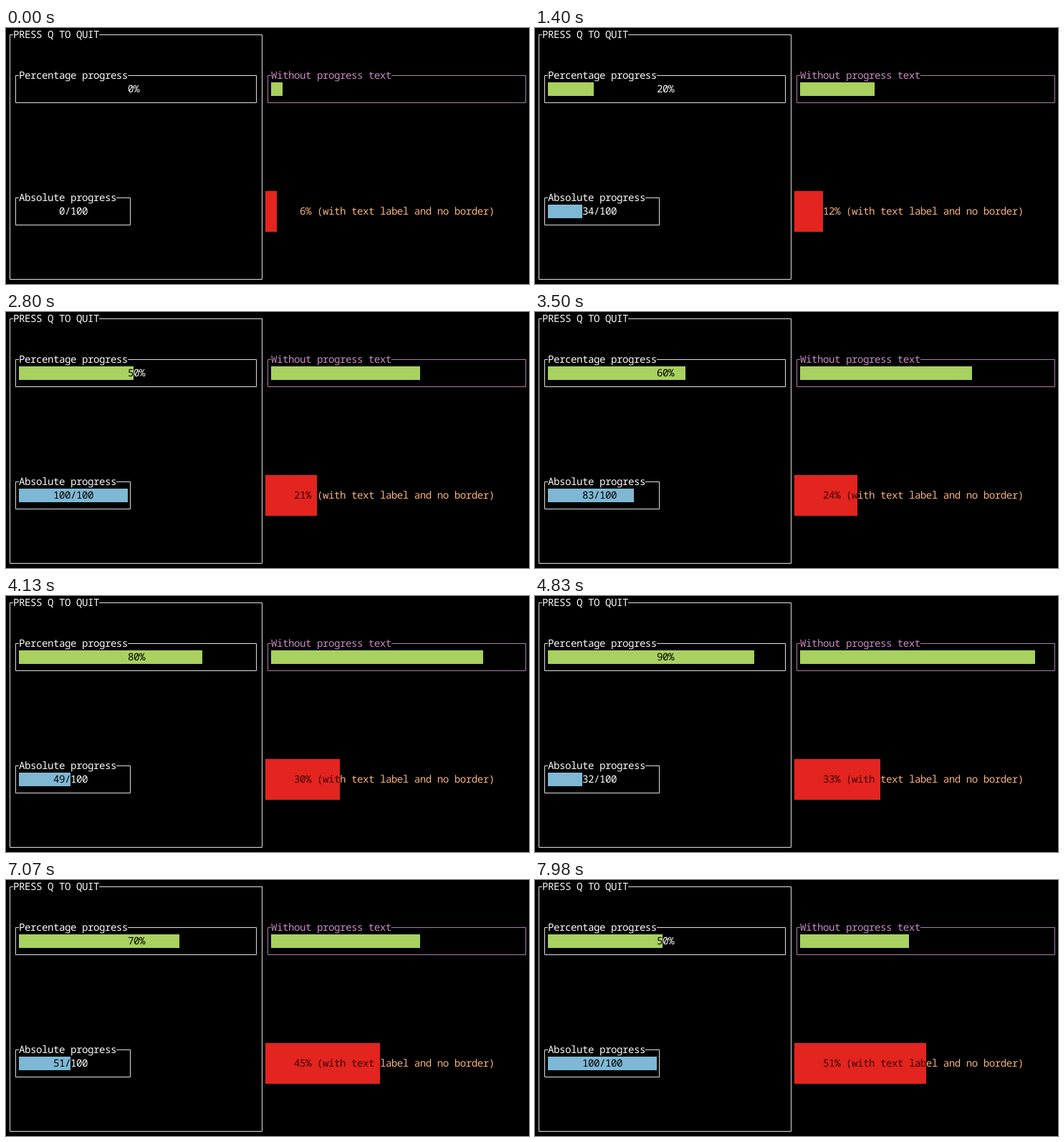
Animation of 730 by 358 pixels, one loop 8 s. Source, as an HTML page:

```html
<!DOCTYPE html>
<html lang="en">
<head>
<meta charset="utf-8">
<title>Gauges</title>
<style>
  html, body { margin: 0; width: 100%; height: 100%; overflow: hidden; background: #000; }
  svg { display: block; }
  text {
    font: 14.2px "Noto Sans Mono", "DejaVu Sans Mono", monospace;
    letter-spacing: -0.52px;
    text-rendering: geometricPrecision;
    white-space: pre;
  }
</style>
</head>
<body>
<svg id="stage" width="730" height="358" viewBox="0 0 730 358"></svg>
<script>
const NS = 'http://www.w3.org/2000/svg';
const stage = document.getElementById('stage');

// Terminal grid
const CW = 8, CH = 19, LEFT = 2, BASE = 14.2;
const colX = c => LEFT + c * CW;
const rowY = r => r * CH;

const LOOP = 8000, FRAME = 70;
const TICK = 262.5, PHASE = 105;

const WHITE = '#fafafa', LINE = '#e0e0e0', PINK = '#c88cc4', PINK_LINE = '#ab80a8';
const GREEN = '#a8d15f', BLUE = '#7fb8d4', RED = '#e3241f', ORANGE = '#f6b27a';

function add(parent, tag, attrs, text) {
  const el = document.createElementNS(NS, tag);
  for (const k in attrs) el.setAttribute(k, attrs[k]);
  if (text) el.textContent = text;
  parent.appendChild(el);
  return el;
}

function frame(c0, r0, c1, r1, title, ink, line) {
  const mid = c => colX(c) + CW / 2 - 0.5;
  const x0 = mid(c0), x1 = mid(c1);
  const y0 = rowY(r0) + 9.5, y1 = rowY(r1) + 9.5;
  const start = colX(c0 + 1), end = start + title.length * CW;
  add(stage, 'path', {
    d: `M${end} ${y0}H${x1}V${y1}H${x0}V${y0}H${start}`,
    fill: 'none', stroke: line, 'stroke-width': 1
  });
  add(stage, 'text', { x: start, y: rowY(r0) + BASE, fill: ink }, title);
}

// Values a gauge passes through, bouncing between 0 and 100
function bounce(step, count, first = 0) {
  const list = [];
  let v = first, dir = 1;
  for (let i = 0; i < count; i++) {
    list.push(v);
    v += step * dir;
    if (100 - v < step) v = 100;
    else if (v < step) v = 0;
    if (v === 100) dir = -1;
    if (v === 0) dir = 1;
  }
  return list;
}

// A filled bar clips its own dark copy of the label
function gauge({ col, row, cols, rows = 1, fill, ink, dark, label, values, fast }) {
  const x = colX(col), y = rowY(row);
  const textRow = (rows - 1) / 2;
  const ty = textRow * CH + BASE;
  const light = add(stage, 'text', { y: y + ty, fill: ink });
  const bar = add(stage, 'svg', { x, y, height: rows * CH, width: 0 });
  add(bar, 'rect', { width: cols * CW, height: rows * CH, fill });
  const over = add(bar, 'text', { y: ty, fill: dark });

  return (quick, slow) => {
    const v = values[fast ? quick : slow];
    const s = label(v);
    const tx = Math.floor((cols - s.length) / 2) * CW;
    bar.setAttribute('width', Math.floor(cols * v / 100) * CW);
    light.setAttribute('x', x + tx);
    over.setAttribute('x', tx);
    light.textContent = over.textContent = s;
  };
}

frame(0, 0, 44, 18, 'PRESS Q TO QUIT', WHITE, LINE);
frame(1, 3, 43, 5, 'Percentage progress', WHITE, LINE);
frame(1, 12, 21, 14, 'Absolute progress', WHITE, LINE);
frame(45, 3, 90, 5, 'Without progress text', PINK, PINK_LINE);

const gauges = [
  gauge({ col: 2, row: 4, cols: 41, fill: GREEN, ink: WHITE, dark: '#000',
    label: v => v + '%', values: bounce(10, 20) }),
  gauge({ col: 2, row: 13, cols: 19, fill: BLUE, ink: WHITE, dark: '#000',
    label: v => v + '/100', values: bounce(17, 20) }),
  gauge({ col: 46, row: 4, cols: 44, fill: GREEN, ink: WHITE, dark: '#000',
    label: () => '', values: bounce(5, 40), fast: true }),
  gauge({ col: 45, row: 12, cols: 46, rows: 3, fill: RED, ink: ORANGE, dark: '#3c0605',
    label: v => v + '% (with text label and no border)', values: bounce(3, 20, 6) })
];

function draw(ms) {
  const t = Math.floor((ms % LOOP) / FRAME) * FRAME;
  const n = Math.floor((t + PHASE) / TICK);
  for (const g of gauges) g(n + 1, n >> 1);
}

const t0 = performance.now();
function loop(now) {
  draw(Math.max(0, now - t0));
  requestAnimationFrame(loop);
}
draw(0);
requestAnimationFrame(loop);
</script>
</body>
</html>
```
